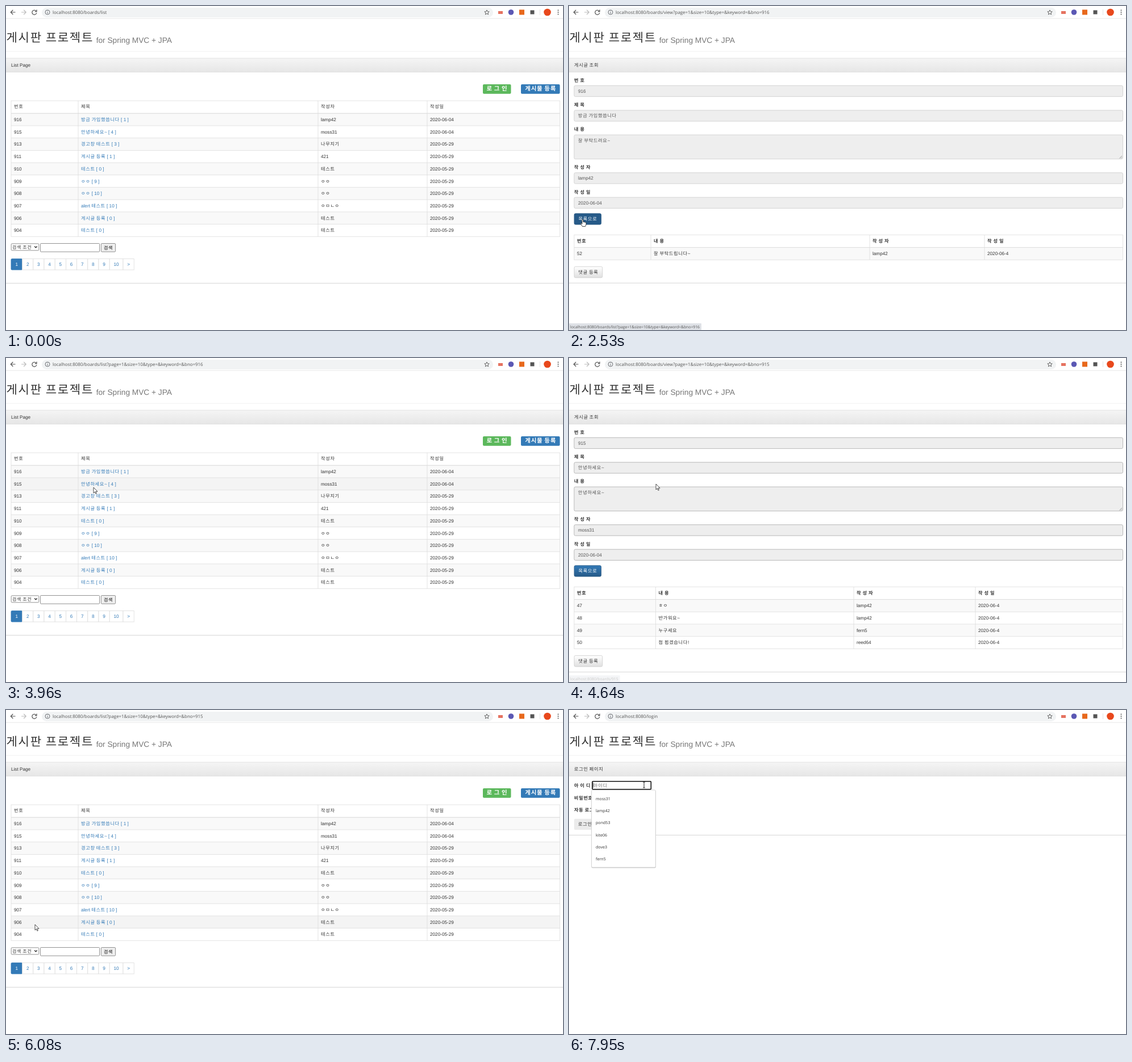
These frames come from a looping animation (980 by 571 pixels, 8000 ms). An HTML page:

```html
<!DOCTYPE html>
<html lang="ko">
<head>
<meta charset="utf-8">
<title>게시판 프로젝트</title>
<style>
html, body { margin: 0; width: 100%; height: 100%; overflow: hidden; background: #fff; }
svg { display: block; }
text { font: 8.2px "Liberation Sans", Arial, sans-serif; fill: #333; white-space: pre; text-rendering: geometricPrecision; }
.k { font-family: "Noto Sans CJK KR", "Noto Sans CJK", sans-serif; letter-spacing: .08em; }
.b { font-weight: bold; }
.ui { font-family: "Open Sans", "Noto Sans", sans-serif; }
</style>
</head>
<body>
<svg id="stage" width="980" height="571" viewBox="0 0 980 571"></svg>
<script>
const stage = document.getElementById('stage');
const BLUE = '#337ab7', ROW = 21.7, LOOP = 8000;
const QUERY = '?page=1&size=10&type=&keyword=&bno=';

// Authors
const A = 'lamp42', B = 'moss31', C = 'fern5', D = 'reed64';

const posts = [
  [916, '방금 가입했씁니다 [ 1 ]', A], [915, '안녕하세요~ [ 4 ]', B],
  [913, '경고창 테스트 [ 3 ]', '나무지기'], [911, '게시글 등록 [ 1 ]', '421'],
  [910, '테스트 [ 0 ]', '테스트'], [909, 'ㅇㅇ [ 9 ]', 'ㅇㅇ'],
  [908, 'ㅇㅇ [ 10 ]', 'ㅇㅇ'], [907, 'alert 테스트 [ 10 ]', 'ㅇㅁㄴㅇ'],
  [906, '게시글 등록 [ 0 ]', '테스트'], [904, '테스트 [ 0 ]', '테스트']
];
const details = {
  916: { title: '방금 가입했씁니다', body: '잘 부탁드려요~', author: A,
    cols: [9, 144, 529, 731], replies: [[52, '잘 부탁드립니다~', A]] },
  915: { title: '안녕하세요~', body: '안녕하세요~', author: B,
    cols: [9, 152.5, 501, 715],
    replies: [[47, 'ㅎㅇ', A], [48, '반가워요~', A], [49, '누구세요', C], [50, '첨 뵙겠습니다!', D]] }
};

// All timing below counts screen updates of STEP ms.
const STEP = 110.5, FIRST = 90;
const pages = [
  [-1, 'list', 'boards/list'], [11, 'view', 'boards/view' + QUERY + 916, 916],
  [26, 'list', 'boards/list' + QUERY + 916], [40, 'view', 'boards/view' + QUERY + 915, 915],
  [53, 'list', 'boards/list' + QUERY + 915], [63, 'login', 'login']
];
const hovers = [
  [8, 11, 'boards/916'], [20, 25, 'boards/list' + QUERY + 916], [36, 40, 'boards/915'],
  [51, 52, 'boards/list' + QUERY + 915], [61, 62, 'login']
];
const path = [
  [0, 806, 498], [3, 520, 330], [7, 230, 205], [8, 195, 205], [11, 193, 205], [15, 186, 214],
  [17, 150, 250], [20, 32, 370], [22, 24, 376], [25, 24, 376], [26, 28, 372], [30, 163, 237],
  [31, 163, 237], [33, 154, 232], [34, 154, 232], [35, 154, 228], [36, 153, 222], [41, 153, 222],
  [42, 156, 226], [45, 350, 305], [47, 250, 388], [50, 61, 384], [51, 51, 378], [54, 51, 378],
  [55, 70, 368], [58, 560, 240], [61, 862, 147], [63, 862, 147], [66, 314, 218],
  [68, 165, 142], [69, 132, 132], [80, 132, 132]
];

const esc = s => String(s).replace(/&/g, '&amp;').replace(/>/g, '&gt;');
const text = (x, y, s, attrs = '') =>
  `<text x="${x}" y="${y}" ${attrs}>${esc(s).replace(/[ㄱ-ㅎ가-힣]+/g, '<tspan class="k">$&</tspan>')}</text>`;
const styled = (x, y, s, css, cls = '') => text(x, y, s, `class="${cls}" style="${css}"`);
const bold = (x, y, s) => text(x, y, s, 'class="b"');
const mid = (x, y, s, css) => styled(x, y, s, 'text-anchor:middle;' + css);
const rect = (x, y, w, h, fill, stroke = 'none', r = 0) =>
  `<rect x="${x}" y="${y}" width="${w}" height="${h}" fill="${fill}" stroke="${stroke}" stroke-width=".8" rx="${r}"/>`;
const hline = (y, color, x = 0, w = 980) => rect(x, y - .4, w, .8, color);
const vline = (x, y, h) => rect(x - .4, y, .8, h, '#ddd');
const draw = (d, color, w = 1.2, fill = 'none') =>
  `<path d="${d}" fill="${fill}" stroke="${color}" stroke-width="${w}"/>`;
const disc = (x, y, r, fill) => `<circle cx="${x}" cy="${y}" r="${r}" fill="${fill}"/>`;
const gradient = (id, a, b) =>
  `<linearGradient id="${id}" x2="0" y2="1"><stop stop-color="${a}"/><stop offset="1" stop-color="${b}"/></linearGradient>`;

const defs = '<defs>' + gradient('head', '#f5f5f5', '#e6e6e6') + gradient('blue', BLUE, '#265a88') +
  gradient('grey', '#fff', '#e0e0e0') + '</defs>';

function browser(url, loading) {
  const wheel = loading ? draw('M46.5 7.5l7 7m0-7l-7 7', '#555')
    : draw('M53 8.8A4 4 0 1 0 53.8 12M54 6.6v3.2h-3.2', '#555');
  return rect(63, 3, 794, 17, '#f1f3f4', 'none', 8.5) +
    draw('M16.5 11H8.5M12.3 7l-4 4 4 4', '#555') + draw('M27 11h8M31.2 7l4 4-4 4', '#bbb') + wheel +
    draw('M77 11a4 4 0 1 0-8 0a4 4 0 1 0 8 0M73 10.5v3M73 8.3v1', '#5f6368', .9) +
    styled(82, 13.9, 'localhost:8080/' + url, 'font-size:7.9px;fill:#555', 'ui') +
    draw('M846 7l1.2 2.8 3 .2-2.3 2 .7 3-2.6-1.6-2.6 1.6.7-3-2.3-2 3-.2z', '#555', .9) +
    rect(866, 9, 8, 5, '#e57361') + disc(888.5, 11, 4.8, '#5b58b4') + rect(903, 6.5, 9, 9, '#e8681c') +
    rect(922.5, 7.5, 7, 7, '#555') + rect(939, 6, .8, 10, '#ddd') + disc(952.5, 11, 6.3, '#e8481c') +
    [7.5, 11, 14.5].map(y => disc(971.5, y, 1, '#555')).join('') + hline(22, '#e2e2e2');
}

function frame(title, bottom) {
  return styled(.5, 63, '게시판 프로젝트', 'font-size:21.1px') +
    styled(158.7, 64.5, 'for Spring MVC + JPA', 'font-size:13.7px;fill:#777') +
    hline(80, '#eee') + rect(0, 92, 980, 24.5, 'url(#head)') + hline(92, '#ddd') + hline(116.5, '#ddd') +
    text(9, 107, title) + hline(bottom, '#ccc');
}

function table(top, cols, heads, rows, headClass, hot, link) {
  const h = 22.3 + ROW * rows.length;
  let s = heads.map((t, i) => text(cols[i] + 5, top + 13.3, t, headClass)).join('');
  rows.forEach((row, r) => {
    const y = top + 22.3 + r * ROW;
    const fill = r === hot ? '#f4f4f4' : r % 2 ? '#fff' : '#f9f9f9';
    s += rect(9, y, 965.5, ROW, fill) + hline(y, '#ddd', 9, 965.5);
    row.forEach((t, i) => {
      s += i === 1 && link ? styled(cols[i] + 5, y + 13.7, t, link(r)) : text(cols[i] + 5, y + 13.7, t);
    });
  });
  s += hline(top + 22.1, '#ddd', 9, 965.5) + rect(9, top, 965.5, h, 'none', '#ddd');
  return s + cols.slice(1).map(x => vline(x, top, h)).join('');
}

function listPage(m, hand) {
  const row = Math.floor((m.y - 189.3) / ROW);
  const hot = m.x > 9 && m.x < 974 ? row : -1;
  const link = r => hand && r === hot ? 'fill:#23527c;text-decoration:underline' : 'fill:' + BLUE;
  const rows = posts.map((p, i) => [...p, i < 2 ? '2020-06-04' : '2020-05-29']);
  const white = 'fill:#fff;font-weight:bold;font-size:10.4px';
  let s = frame('List Page', 488.7) +
    rect(839, 138, 49.5, 16.7, hand && m.x > 838 ? '#449d44' : '#5cb85c', 'none', 2) + mid(864, 149.3, '로 그 인', white) +
    rect(906, 138, 68.5, 16.7, BLUE, 'none', 2) + mid(940.7, 149.3, '게시물 등록', white) +
    table(167, [9, 127, 549, 741], ['번호', '제목', '작성자', '작성일'], rows, '', hot, link) +
    rect(9.2, 418.8, 48.6, 12, '#fff', '#767676', 1.5) + styled(11, 428.2, '검색 조건', 'font-size:8px') +
    draw('M50.2 423.5l2.2 2.4 2.2-2.4', '#222', 1.3) +
    rect(60.5, 418.5, 104, 14.7, '#fff', '#767676', 1) + rect(167.3, 418.5, 25.3, 14.7, '#efefef', '#767676', 1.5) +
    mid(180, 428.7, '검색', 'font-size:8px;fill:#000');
  let x = 9;
  [1, 2, 3, 4, 5, 6, 7, 8, 9, 10, '>'].forEach((t, i) => {
    const w = t === 10 ? 23.8 : i ? 19.2 : 19.6;
    s += rect(x, 445.5, w, 19.5, i ? '#fff' : BLUE, i ? '#ddd' : BLUE, i ? 0 : 1.5) +
      mid(x + w / 2, 458.1, t, 'fill:' + (i ? BLUE : '#fff'));
    x += w;
  });
  return s;
}

function viewPage(id, m, border) {
  const d = details[id], extra = (d.replies.length - 1) * ROW;
  const fields = [['번 호', 140, id], ['제 목', 183.5, d.title], ['내 용', 226.8, d.body],
    ['작 성 자', 293.5, d.author], ['작 성 일', 336.9, '2020-06-04']];
  const over = m.x > 9 && m.x < 57 && m.y > 365 && m.y < 385;
  return frame('게시글 조회', 488.2 + extra) +
    fields.map(([label, y, value], i) => bold(9, y - 6.4, label) +
      rect(9, y + .3, 965.5, i === 2 ? 42.6 : 19.3, '#eee', border, 2.3) +
      styled(16, y + 12.9, value, 'fill:#555')).join('') +
    draw('M968.5 268.5l4.5-4.5M971 268.5l2-2', '#777', .7) +
    rect(9.2, 365.8, 47.4, 19.3, over ? '#265a88' : 'url(#blue)', '#245580', 2.3) +
    mid(33, 378.2, '목록으로', 'fill:#fff') +
    table(403.3, d.cols, ['번호', '내 용', '작 성 자', '작 성 일'], d.replies.map(r => [...r, '2020-06-4']), 'class="b"') +
    rect(9.2, 459.3 + extra, 49.6, 19.5, 'url(#grey)', '#ccc', 2.3) + mid(34, 471.9 + extra, '댓글 등록', '');
}

function loginPage(open) {
  let s = frame('로그인 페이지', 220.5) + bold(9, 135.6, '아 이 디') + bold(9, 157.8, '비밀번호') + bold(9, 179.2, '자동 로그인') +
    rect(41, 125.5, 103.5, 14.5, '#fff', '#767676', 1) + styled(43, 135.6, '아이디', 'fill:#757575') +
    rect(44, 147.5, 103.5, 14.5, '#fff', '#767676', 1) + styled(46, 157.6, '비밀번호', 'fill:#757575') +
    rect(55, 172.5, 7, 7, '#fff', '#767676', 1) +
    rect(9, 191.7, 39, 19.5, '#ebebeb', 'none', 2.3) + text(16, 204.2, '로그인');
  if (!open) return s;
  s += '<rect x="41" y="125.7" width="103.3" height="14.2" rx="1.5" fill="none" stroke="#111" stroke-width="1.6"/>' +
    rect(42.6, 128, .6, 9, '#000') + rect(39.5, 142, 113.3, 136.5, '#ccc', 'none', 2) +
    rect(39.6, 141, 112.8, 136.3, '#fff', '#ccc', 2);
  return s + [B, A, 'pond53', 'kite06', 'dove3', C]
    .map((t, i) => styled(47, 159.2 + i * 21.1, t, 'font-size:7.1px', 'ui')).join('');
}

function cursor(m, kind) {
  const shapes = {
    arrow: draw('M0 0v10l2.3-2.1 1.6 3.5 1.5-.7-1.6-3.4h3.2z', '#222', .8, '#fff'),
    hand: draw('M-1 .8q1-1.3 2 0v4q1-.8 1.9.2 1-.6 1.7.3 1.4-.3 1.4 1v3l-1.2 3.2h-5.3l-3-5q.2-1.3 1.3-.6l1.2 1.3z', '#222', .8, '#fff'),
    beam: draw('M-2-5h1.5q.5 0 .5.7v8.6q0 .7-.5.7H-2M2-5H.5Q0-5 0-4.3M0 4.3q0 .7.5.7H2', '#111', .9)
  };
  return `<g transform="translate(${m.x} ${m.y})">${shapes[kind]}</g>`;
}

function mouseAt(n) {
  const i = Math.max(1, path.findIndex(p => p[0] >= n));
  const [a, x, y] = path[i - 1], [b, u, v] = path[i], f = (n - a) / (b - a);
  return { x: x + (u - x) * f, y: y + (v - y) * f };
}

function render(n) {
  const [since, kind, url, id] = pages.filter(p => p[0] <= n).pop();
  const m = n < 0 ? { x: -99, y: -99 } : mouseAt(n);
  const hover = hovers.find(h => n >= h[0] && n <= h[1] + 1);
  const hand = !!hover && n <= hover[1];
  const border = n === since ? '#777' : n === 41 ? '#aaa' : '#ccc';
  const page = kind === 'list' ? listPage(m, hand) : kind === 'view' ? viewPage(id, m, border) : loginPage(n >= 71);
  let s = defs + rect(0, 0, 980, 571, '#fff') + browser(url, kind === 'view' && n === since) + page;
  if (hover) {
    s += `<g opacity="${hand ? 1 : .3}">` + rect(0, 559.3, 91, 12, '#dee1e6', 'none', 1).replace('<rect', '<rect id="bar"') +
      styled(2, 568.3, 'localhost:8080/' + hover[2], 'font-size:6.8px;fill:#555', 'ui').replace('<text', '<text id="status"') + '</g>';
  }
  if (n >= 0) s += cursor(m, hand ? 'hand' : n >= 69 ? 'beam' : 'arrow');
  stage.innerHTML = s;
  if (hover) {
    const width = document.getElementById('status').getComputedTextLength();
    document.getElementById('bar').setAttribute('width', width + 5);
  }
}

let shown;
function tick() {
  const n = Math.floor((performance.now() % LOOP - FIRST) / STEP);
  if (n !== shown) render(shown = n);
  requestAnimationFrame(tick);
}
tick();
</script>
</body>
</html>
```
